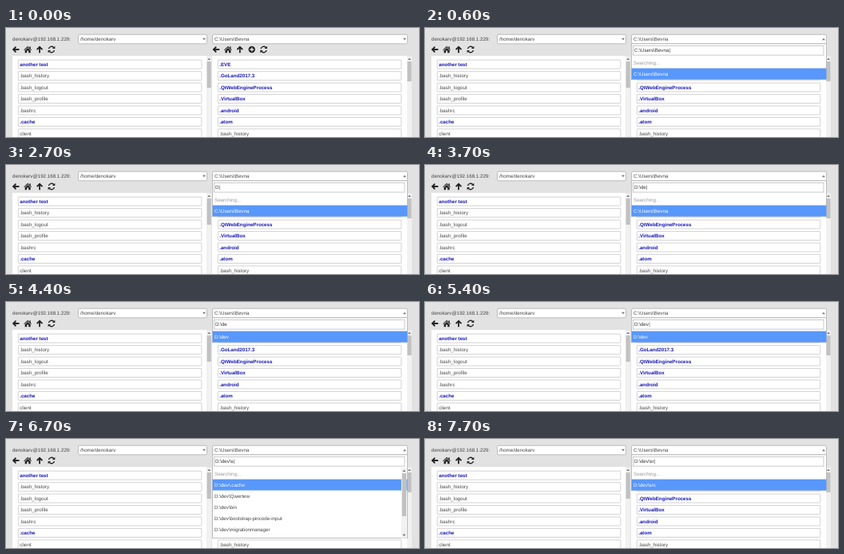
An HTML page for the animation above (8000 ms loop, 517 by 137 pixels).

```html
<!DOCTYPE html>
<html lang="en">
<head>
<meta charset="utf-8">
<title>Path picker</title>
<style>
  html, body { margin: 0; width: 100%; height: 100%; overflow: hidden; background: #e2e2e2; }
  svg { display: block; width: 517px; height: 137px; }
  text {
    font: 6.2px "Liberation Sans", Arial, sans-serif;
    white-space: pre;
    text-rendering: geometricPrecision;
  }
  .dir { font-weight: bold; fill: #1414b4; }
</style>
</head>
<body>
<svg viewBox="0 0 517 137">
  <g id="base"></g>
  <g id="popup"></g>
</svg>
<script>
const LOOP = 8000, BLINK = 700;
const LIST_TOP = 36.6, ROW = 14;
const HOME = 'C:\\Users\\Bevna', DEV = 'D:\\dev';
const children = ['.cache', 'Qwertew', 'bin', 'bootstrap-pincode-input', 'migrationmanager', 'src']
  .map(name => DEV + '\\' + name);
const SRC = children[5];

// time, typed text, searching, results
const steps = [
  [300, HOME, true, [HOME]],
  [900, HOME, false, [HOME]],
  [1700, HOME.slice(0, 13), false, [HOME]],
  [1800, HOME.slice(0, 11), false, [HOME]],
  [1900, HOME.slice(0, 8), false, [HOME]],
  [2000, HOME.slice(0, 5), false, [HOME]],
  [2100, HOME.slice(0, 2), false, [HOME]],
  [2200, '', false, [HOME]],
  [2700, 'D', true, [HOME]],
  [3100, 'D:', true, [HOME]],
  [3400, 'D:\\', true, [HOME]],
  [3600, 'D:\\d', true, [HOME]],
  [3700, 'D:\\de', true, [HOME]],
  [4200, 'D:\\de', false, [DEV]],
  [4800, DEV, true, [DEV]],
  [5400, DEV, false, [DEV]],
  [5800, DEV + '\\', true, [DEV]],
  [6300, DEV + '\\', false, children],
  [6700, DEV + '\\s', true, children],
  [7300, DEV + '\\s', false, [SRC]],
  [7700, DEV + '\\sr', true, [SRC]]
];

const rect = (x, y, w, h, fill, extra = '') =>
  `<rect x="${x}" y="${y}" width="${w}" height="${h}" fill="${fill}" ${extra}/>`;
const box = (x, y, w, h, stroke, r = 0) =>
  rect(x + .5, y + .5, w - 1, h - 1, '#fff', `stroke="${stroke}" stroke-width=".8" rx="${r}"`);
const label = (x, y, s, fill = '#444', cls = '') =>
  `<text x="${x}" y="${y}" fill="${fill}" class="${cls}">${s}</text>`;
const tri = (x, y, up, fill = '#777') =>
  `<path d="M${x - 2} ${y + (up ? 1.2 : -1.2)}h4l-2 ${up ? -2.4 : 2.4}z" fill="${fill}"/>`;

// icons are centred on 0,0
const line = (d, w = 1.9) => `<path d="${d}" fill="none" stroke="#222" stroke-width="${w}"/>`;
const icons = {
  back: line('M4.4 0H-3M.2 -3.6L-3.4 0L.2 3.6'),
  up: line('M0 4.4V-3M-3.6 .2L0 -3.4L3.6 .2'),
  home: '<path d="M-5.2 .4L0 -4.4L2.4 -2.2V-4H3.8V-.9L5.2 .4L4.5 1.1L0 -3L-4.5 1.1z" fill="#222"/>' +
    '<path d="M-3.7 1.2L0 -2.1L3.7 1.2V4.4H1.1V1.6H-1.1V4.4H-3.7z" fill="#222"/>',
  plus: '<circle r="4.4" fill="#222"/><path d="M-2.6 0H2.6M0 -2.6V2.6" stroke="#e2e2e2" stroke-width="1.5"/>',
  refresh: line('M-3.7 -.8A3.8 3.8 0 0 1 2.9 -2.6M3.7 .8A3.8 3.8 0 0 1 -2.9 2.6', 1.4) +
    '<path d="M4.6 -4.6V-1H1zM-4.6 4.6V1H-1z" fill="#222"/>'
};
const toolbar = (x, names) => names.map((n, i) =>
  `<g transform="translate(${x + i * 14.9} 27) scale(.95)">${icons[n]}</g>`).join('');

function scrollbar(x, y, h, thumb) {
  return rect(x, y, 6, h, '#f1f1f1') + rect(x + .4, y + 6.5, 5.2, thumb, '#c1c1c1') +
    tri(x + 3, y + 3.3, true, '#777');
}

function panel(x, width, files, thumb) {
  let out = rect(x, 35, width, 102, '#fff') + scrollbar(x + width, 35.6, 101.4, thumb);
  files.forEach(([name, dir], i) => {
    const y = 39.7 + i * 14.45;
    out += box(x + 6.8, y, 230.5, 12, '#c8c8c8', .5) + label(x + 9.2, y + 8.3, name, '#444', dir ? 'dir' : '');
  });
  return out;
}

const select = (x, w, s) => box(x, 7.7, w, 12.6, '#b0b0b0', 1.5) + label(x + 3, 16.3, s);

const left = ['another test', '.bash_history', '.bash_logout', '.bash_profile', '.bashrc', '.cache', 'client']
  .map((n, i) => [n, i === 0 || i === 5]);
const right = ['.EVE', '.GoLand2017.3', '.QtWebEngineProcess', '.VirtualBox', '.android', '.atom', '.bash_history']
  .map((n, i) => [n, i < 6]);

const base = document.getElementById('base');
const popup = document.getElementById('popup');

base.innerHTML = label(8, 16.3, 'denokarv@192.168.1.229:') +
  select(90, 162, '/home/denokarv') + tri(248, 14, false) +
  select(258, 245, HOME) +
  toolbar(12.3, ['back', 'home', 'up', 'refresh']) +
  toolbar(263, ['back', 'home', 'up', 'plus', 'refresh']) +
  panel(8, 243.2, left, 33) + panel(258, 244, right, 25);

function drawPopup([, typed, searching, list], caret) {
  const skip = searching ? 1 : 0;
  const rows = list.length + skip;
  const long = rows > 5;
  const bottom = long ? 125 : LIST_TOP + rows * ROW + .6;
  let out = tri(499, 14, true) + box(258, 19.3, 245, bottom - 19.3, '#b0b0b0') +
    box(260, 21.8, 239.5, 12.8, '#bbb') +
    `<text x="262" y="30.1" fill="#333">${typed}<tspan dx=".3" font-size="6">${caret ? '|' : ''}</tspan></text>`;
  if (searching) out += label(261, LIST_TOP + 9.1, 'Searching...', '#999');
  list.slice(0, 6 - skip).forEach((name, i) => {
    const y = LIST_TOP + (i + skip) * ROW;
    if (i === 0) out += rect(258.6, y, 243.8, ROW, '#5897fb');
    out += label(261, y + 9.1, name, i ? '#444' : '#fff');
  });
  if (long) out += rect(494.8, LIST_TOP, 2, 88, '#f1f1f1') + scrollbar(495.4, LIST_TOP, 88, 54) + tri(498.4, 121, false);
  return out;
}

let last = '';
function draw(t) {
  const step = steps.filter(s => s[0] <= t).pop();
  let html = tri(499, 14, false);
  if (step) {
    const edited = steps.find(s => s[1] === step[1])[0];
    html = drawPopup(step, (t - edited) % (2 * BLINK) < BLINK);
  }
  if (html !== last) popup.innerHTML = last = html;
}

const start = performance.now();
function tick() {
  draw((performance.now() - start) % LOOP);
  requestAnimationFrame(tick);
}
tick();
</script>
</body>
</html>
```
